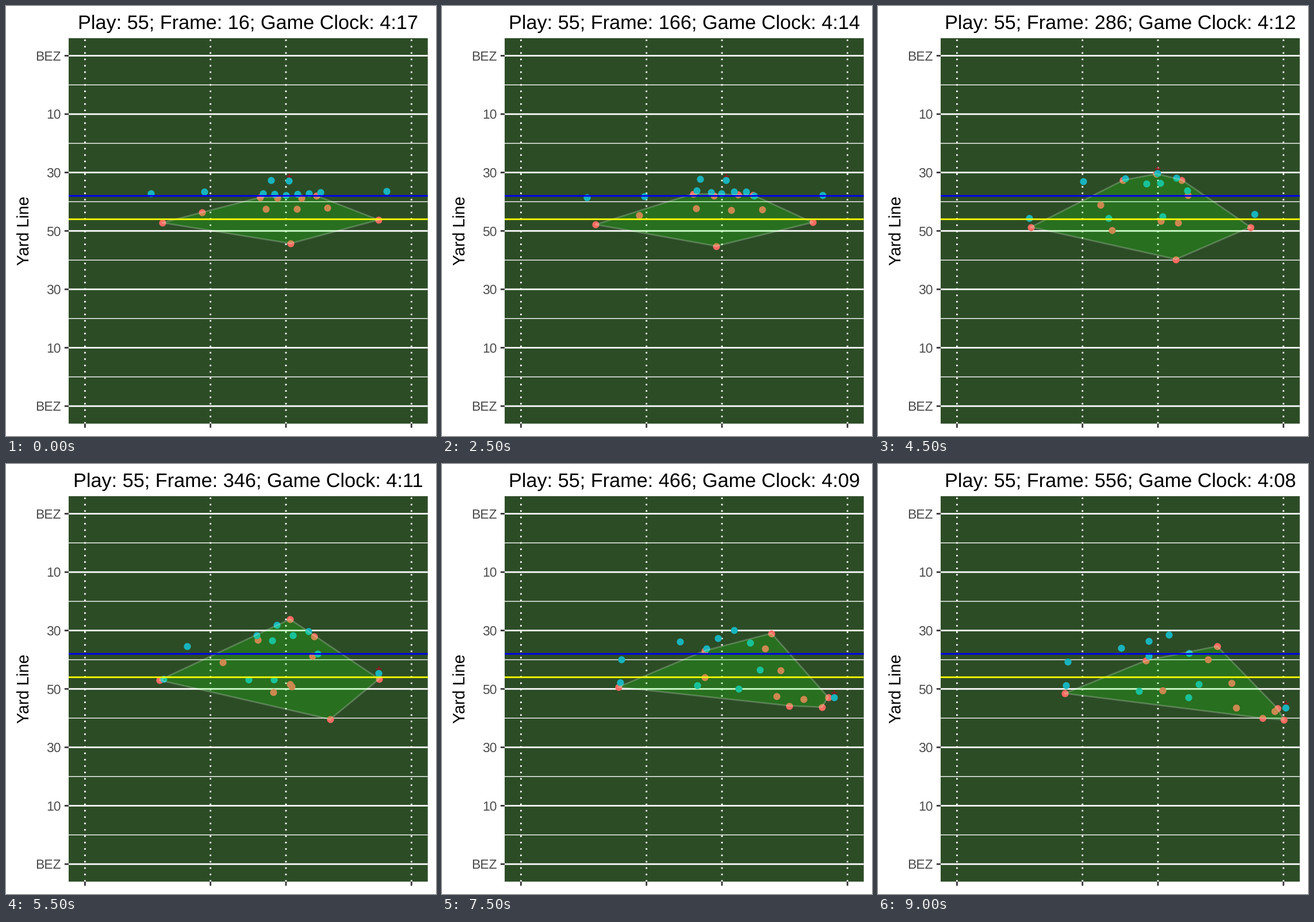
These frames come from a looping animation (748x748 px, 9.5 s). A matplotlib script:

```python
import numpy as np
import matplotlib.pyplot as plt
from matplotlib.animation import FuncAnimation
from matplotlib.patches import Polygon, Rectangle

SIZE, DPI = 748, 100
STEPS, INTERVAL = 19, 500
LEFT, RIGHT, TOP, BOTTOM = 109, 733.7, 56, 726.5
FIELD, SALMON, TEAL = "#2c4c26", "#f96b61", "#18b4be"
BASE = 28.6                    # base font size in pixels
LINE, TICK = 2.773, 7.15
SNAP, BREAK, CATCH, END = 4, 7, 11, 18
RELEASE = 9

plt.rcParams["font.family"] = "Liberation Sans"
plt.rcParams["text.hinting"] = "no_hinting"


def pt(px):
    return px * 72 / DPI


def lerp(a, b, s):
    return a + (b - a) * s


class Runner:
    """Drift to the set position, burst off the snap, run on, chase the catch."""

    def __init__(self, start, broke, caught, end, bend=(0, 0), drift=0):
        self.start, self.broke, self.caught, self.end, self.bend = (
            np.array(p, float) for p in (start, broke, caught, end, bend))
        self.drift = np.array([drift, 0])

    def at(self, k):
        if k < SNAP:
            return self.start + self.drift * min(k / (SNAP - 1), 1)
        if k < BREAK:
            s = (k - SNAP) / (BREAK - SNAP)
            return lerp(self.start + self.drift, self.broke, s ** 1.5)
        if k < CATCH:
            return lerp(self.broke, self.caught, (k - BREAK) / (CATCH - BREAK))
        # pursuit runs across the field first, then downfield
        s = (k - CATCH) / (END - CATCH)
        hump = s * (1 - s)
        ease = s + hump * np.array([0.45, -0.2])
        return lerp(self.caught, self.end, ease) + 4 * hump * self.bend


passer = Runner((492, 304), (501, 301), (471, 280), (506, 297), bend=(13, 0))
catcher = Runner((662, 322), (662, 360), (648, 364), (709, 424), bend=(-8, 11))
wide = Runner((252, 326), (252, 363), (274, 374), (327, 385))
slot = Runner((345, 323), (381, 363), (422, 375), (454, 395))
back = Runner((461, 303), (399, 292), (315, 317), (330, 344), bend=(-13, 9))
tight_end = Runner((547, 324), (525, 356), (466, 375), (540, 406))

blocks = [((424, 302), (436, 298), (423, 320), (-13, 0)),
          ((471, 310), (463, 307), (471, 334), (-9, 0)),
          ((483, 318), (499, 298), (471, 308)),
          ((513, 306), (526, 291), (541, 329)),
          ((535, 312), (542, 330), (558, 383))]
line = [Runner((447 + 20 * i, 328.5 - abs(i - 2) * 1.5), *path)
        for i, path in enumerate(blocks)]
offense = [wide, slot, back, *line, tight_end, passer, catcher]

rushers = [
    Runner((442, 333), (415, 300), (438, 306), (466, 342)),
    Runner((472, 334), (475, 314), (494, 270), (590, 317), bend=(14, 0)),
    Runner((514, 334), (521, 305), (536, 300), (574, 340)),
    Runner((540, 330), (545, 323), (533, 334), (615, 381)),
]
linebackers = [
    Runner((452, 353), (398, 346), (377, 345), (495, 394)),
    Runner((506, 353), (491, 364), (494, 383), (623, 424)),
    Runner((559, 351), (548, 366), (497, 387), (690, 430)),
]
secondary = [
    Runner((272, 377), (265, 393), (267, 376), (325, 399), drift=-4),
    Runner((341, 359), (349, 383), (465, 397), (669, 442)),
    Runner((495, 413), (473, 437), (564, 444), (706, 445), bend=(0, -22), drift=-17),
    Runner((648, 372), (647, 395), (649, 374), (695, 425), bend=(-9, 5), drift=-4),
]
defense = rushers + linebackers + secondary


def ball_at(k):
    if k <= RELEASE:
        return passer.at(k)
    if k >= CATCH:
        return catcher.at(k)
    return lerp(passer.at(RELEASE), catcher.at(CATCH), (k - RELEASE) / (CATCH - RELEASE))


def convex_hull(points):
    pts = sorted(map(tuple, points))

    def chain(seq):
        out = []
        for p in seq:
            while len(out) > 1:
                (ax, ay), (bx, by) = out[-2:]
                if (bx - ax) * (p[1] - ay) - (by - ay) * (p[0] - ax) > 0:
                    break
                out.pop()
            out.append(p)
        return out[:-1]

    return chain(pts) + chain(pts[::-1])


fig = plt.figure(figsize=(SIZE / DPI, SIZE / DPI), dpi=DPI, facecolor="white")
ax = fig.add_axes([0, 0, 1, 1])
ax.set_xlim(0, SIZE)
ax.set_ylim(SIZE, 0)
ax.axis("off")


def segment(xs, ys, color="white", width=LINE, z=1, **kw):
    ax.plot(xs, ys, color=color, lw=pt(width), zorder=z, snap=False,
            solid_capstyle="butt", dash_capstyle="butt", **kw)


def label(x, y, text, size, color="black", **kw):
    return ax.text(x, y, text, fontsize=pt(size), color=color, va="baseline", **kw)


def across(yard, **kw):
    y = yard_y(yard)
    segment((LEFT, RIGHT), (y, y), **kw)


def yard_y(yard):
    # 120 yards with a margin of 6 yards at both ends
    return lerp(TOP, BOTTOM, (yard + 6) / 132)


# field, grid and axes
ax.add_patch(Rectangle((LEFT, TOP), RIGHT - LEFT, BOTTOM - TOP,
                       fc=FIELD, lw=0, zorder=0, snap=False))
for yard in range(10, 120, 20):
    across(yard, width=LINE / 2)
for i, name in enumerate(("BEZ", "10", "30", "50", "30", "10", "BEZ")):
    y = yard_y(20 * i)
    across(20 * i)
    segment((LEFT - TICK, LEFT), (y, y), "#333333")
    label(96, y + 8.2, name, 0.8 * BASE, "#4d4d4d", ha="right")
for share in (0, 0.3844, 0.6156, 1):
    x = lerp(LEFT, RIGHT, (share + 0.05) / 1.1)
    segment((x, x), (BOTTOM, TOP), ls=(0, (1, 3)))
    segment((x, x), (BOTTOM, BOTTOM + TICK), "#333333")
label(40, (TOP + BOTTOM) / 2, "Yard Line", BASE, ha="center",
      rotation=90, rotation_mode="anchor")

# scrimmage and first-down lines
across(48, color="#0000f0", z=6)
across(56, color="#ffff00", z=6)

title = label((LEFT + RIGHT) / 2, 39.5, "", 1.2 * BASE, ha="center")


def dots(color, z):
    return ax.plot([], [], "o", ms=pt(12.2), mfc=color, mew=0, zorder=z, snap=False)[0]


red_dots, teal_dots = dots(SALMON, 2), dots(TEAL, 3)
ball = label(0, 0, "*", BASE, "#9e1220", ha="center", zorder=2.5)
hull = ax.add_patch(Polygon([(0, 0)] * 3, fc=(0.1, 1, 0.03, 0.2), ec=(1, 1, 1, 0.22),
                            lw=pt(LINE), joinstyle="round", zorder=5))


def update(k):
    clock = 257 - (k + 1) // 2
    title.set_text(f"Play: 55; Frame: {16 + 30 * k}; "
                   f"Game Clock: {clock // 60}:{clock % 60:02d}")
    red = np.array([p.at(k) for p in defense])
    red_dots.set_data(*red.T)
    teal_dots.set_data(*np.array([p.at(k) for p in offense]).T)
    hull.set_xy(convex_hull(red))
    x, y = ball_at(k)
    ball.set_position((x, y + 9))
    return title, red_dots, teal_dots, ball, hull


anim = FuncAnimation(fig, update, frames=STEPS, interval=INTERVAL,
                     repeat=True, repeat_delay=0, blit=False)
plt.show()
```
